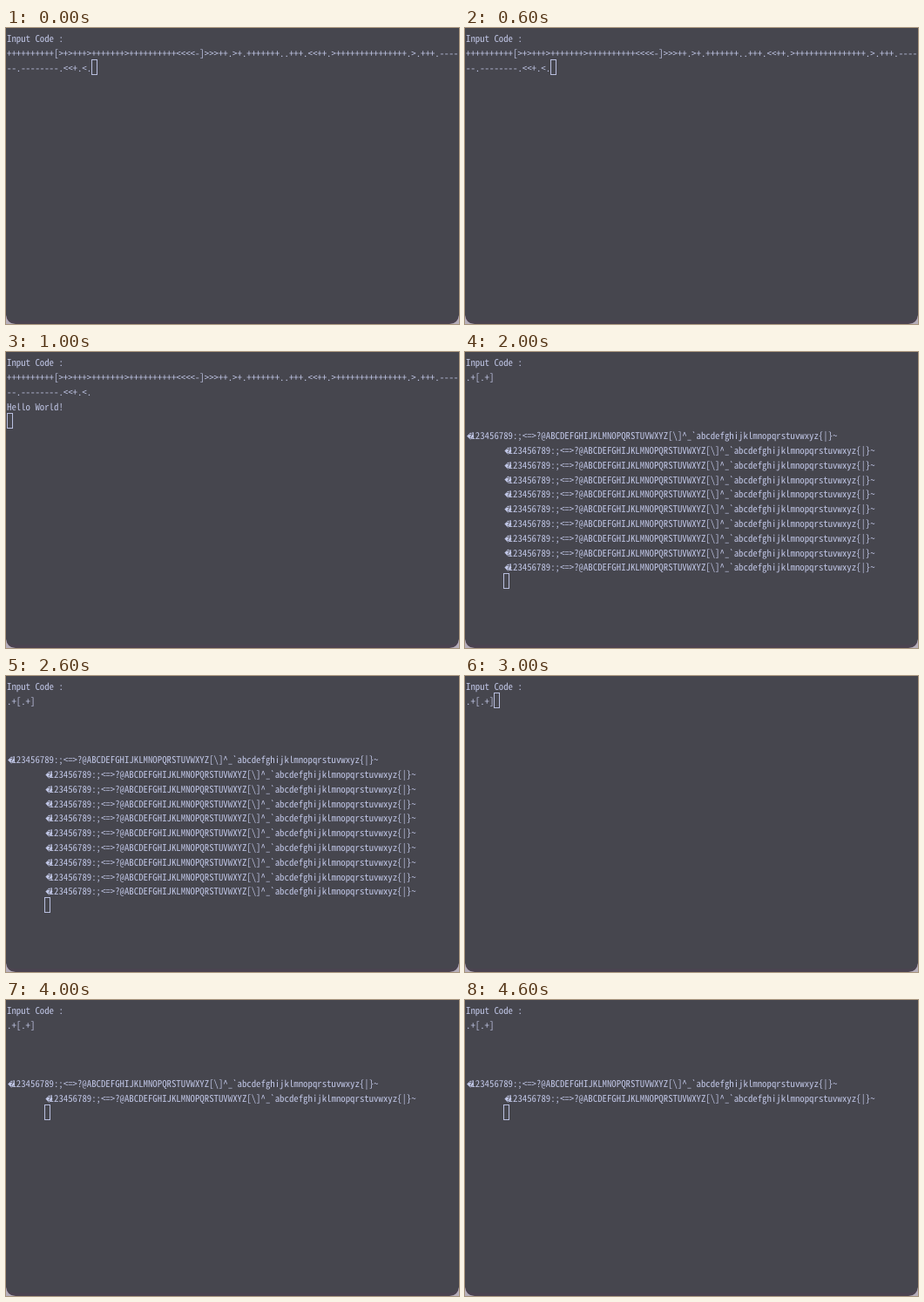
An HTML page for the animation above (5000 ms loop, 520x340 px).

```html
<!DOCTYPE html>
<html lang="en">
<head>
<meta charset="utf-8">
<title>Interpreter terminal</title>
<style>
html, body { margin: 0; width: 100%; height: 100%; overflow: hidden; background: #b7afbb; }
svg { display: block; }
text { white-space: pre; fill: #c0c6e6; text-rendering: geometricPrecision; }
#screen { font-family: "Noto Sans Mono CJK JP", "Noto Sans Mono", monospace; font-size: 100px; font-variant-ligatures: none; }
#screen .bad { font: 8.2px "DejaVu Sans", sans-serif; text-anchor: middle; }
.cursor { fill: none; stroke: #b9bfdf; }
</style>
</head>
<body>
<svg width="520" height="340" viewBox="0 0 520 340">
  <path d="M0 0H520V329Q519 340 509 340H11Q1 340 0 329Z" fill="#4b4350"/>
  <path d="M0 0H520V329Q518 336.5 510 336.5H10Q2 336.5 0 329Z" fill="#46464e"/>
  <g id="screen"></g>
</svg>
<script>
const NS = "http://www.w3.org/2000/svg";
const COL = 5.4, ROW = 16.8, LEFT = 1, BASE = 16.2;
const screen = document.getElementById("screen");

function add(tag, attrs, content = "") {
  const el = document.createElementNS(NS, tag);
  for (const key in attrs) el.setAttribute(key, attrs[key]);
  el.textContent = content;
  return screen.appendChild(el);
}

const print = (row, col, str) =>
  add("text", { x: LEFT + col * COL, y: BASE + row * ROW }, str);

const cursor = (row, col) => add("rect", {
  class: "cursor", x: Math.floor(LEFT + col * COL) + 0.5,
  y: Math.round(2.4 + row * ROW) + 0.5, width: 6, height: 17
});

// Choose the type size whose character cell is one column wide.
const probe = print(0, 0, "0".repeat(10));
screen.style.fontSize = 1000 * COL / probe.getComputedTextLength() + "px";

const hello = "++++++++++[>+>+++>+++++++>++++++++++<<<<-]>>>++.>+.+++++++..+++." +
  "<<++.>+++++++++++++++.>.+++.------.--------.<<+.<.";
const loop = ".+[.+]";
const ascii = Array.from({ length: 78 }, (_, i) => String.fromCharCode(49 + i)).join("");

function showHello(done) {
  print(1, 0, hello.slice(0, 96));
  print(2, 0, hello.slice(96));
  if (done) print(3, 0, "Hello World!");
  cursor(done ? 4 : 2, done ? 0 : 18);
}

function showLoop(count) {
  print(1, 0, loop);
  for (let i = 0; i < count; i++) {
    const row = 5 + i, col = i ? 8 : 0;
    add("text", { class: "bad", x: LEFT + col * COL + 5.2, y: BASE + row * ROW - 0.3 }, "\uFFFD");
    print(row, col + 1, ascii);
  }
  cursor(count ? 5 + count : 1, count ? 8 : loop.length);
}

const scenes = [
  () => showHello(false),
  () => showHello(true),
  () => showLoop(10),
  () => showLoop(0),
  () => showLoop(2)
];

let shown = -1;
const start = performance.now();
function tick() {
  const scene = Math.floor((performance.now() - start) / 1000) % scenes.length;
  if (scene !== shown) {
    shown = scene;
    screen.replaceChildren();
    print(0, 0, "Input Code :");
    scenes[scene]();
  }
  requestAnimationFrame(tick);
}
tick();
</script>
</body>
</html>
```
